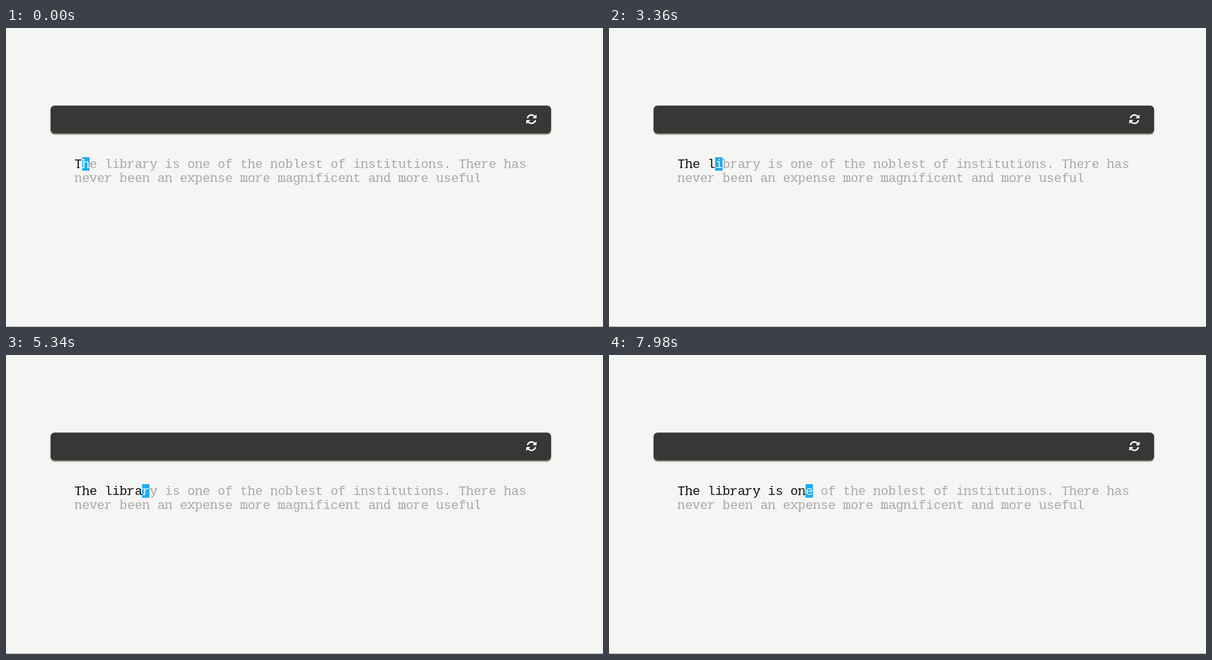
These frames come from a looping animation (1057x530 px, 8000 ms). An HTML page with a canvas:

```html
<!DOCTYPE html>
<html lang="en">
<head>
<meta charset="utf-8">
<title>Typing practice</title>
<style>
  html, body { margin: 0; width: 100%; height: 100%; overflow: hidden; background: #f5f5f4; }
  canvas { display: block; }
</style>
</head>
<body>
<canvas id="stage" width="1057" height="530"></canvas>
<script>
const ctx = document.getElementById('stage').getContext('2d');
const LOOP = 8000;
const LEFT = 121.3, PITCH = 13.335, BASE = 248.3, LEADING = 24.2;
const LINES = [
  'The library is one of the noblest of institutions. There has',
  'never been an expense more magnificent and more useful'
];
// Moments at which the cursor steps one letter onward.
const KEYS = [120, 400, 720, 960, 3640, 5020, 5180, 5320, 5460, 5740,
  6180, 6700, 7140, 7820, 7880, 7940];

// Slab ends: column, row, and an optional side for half slabs.
const COLS = { L: 2.5, M: 1.9, C: 6.6, F: 5.9, N: 11.4, R: 10.8 };
const ROWS = { A: -15.4, x: -10.9, b: -0.8, d: 3.8 };
const SLABS = {
  T: 'Cb', h: 'LA< Lb Rb', n: 'Lx< Lb Rb', m: 'Mx< Mb Cb Nb', b: 'LA< Lb<',
  d: 'RA< Rb>', u: 'Lx< Rx< Rb>', a: 'Rb>', y: 'Lx Rx', v: 'Lx Rx',
  x: 'Lx Rx Lb Rb', p: 'Lx< Ld', g: 'Rx>', f: 'Fb', r: 'Lb Lx<'
};

function drawLetter(ch, x, y, color) {
  ctx.fillStyle = color;
  ctx.fillText(ch, x, y);
  for (const slab of (SLABS[ch] || '').split(' ')) {
    if (!slab) continue;
    const [col, row, side] = slab;
    const cx = x + COLS[col];
    const from = side === '>' ? cx : cx - 2.2;
    const to = side === '<' ? cx : cx + 2.2;
    ctx.fillRect(from, y + ROWS[row] - 0.8, to - from, 1.6);
  }
}

function drawText(cursor) {
  ctx.font = '22.22px "Liberation Mono", "Courier New", monospace';
  ctx.textBaseline = 'alphabetic';
  ctx.fillStyle = '#1eabf2';
  ctx.fillRect(Math.round(LEFT + cursor * PITCH), 229, 13, 24);
  LINES.forEach((line, row) => {
    [...line].forEach((ch, i) => {
      let color = '#a9a9a9';
      if (row === 0 && i < cursor) color = '#111111';
      if (row === 0 && i === cursor) color = '#e9f6fd';
      drawLetter(ch, LEFT + i * PITCH, BASE + row * LEADING, color);
    });
  });
}

function drawBar() {
  ctx.save();
  ctx.shadowColor = 'rgba(70, 64, 48, 0.8)';
  ctx.shadowOffsetY = 2;
  ctx.shadowBlur = 2;
  ctx.fillStyle = '#373736';
  ctx.beginPath();
  ctx.roundRect(79, 137.5, 886, 49, 7);
  ctx.fill();
  ctx.restore();
}

// Half of the reload icon; the other half is the same turned by 180 degrees.
function drawArrow() {
  ctx.lineWidth = 2.7;
  ctx.beginPath();
  ctx.arc(0, 0, 7.4, 0.24, 2.5);
  ctx.stroke();
  ctx.lineWidth = 1;
  ctx.beginPath();
  ctx.moveTo(-8.6, 2);
  ctx.lineTo(-2.9, 2);
  ctx.lineTo(-8.6, 7.7);
  ctx.closePath();
  ctx.fill();
  ctx.stroke();
}

function drawReload() {
  ctx.save();
  ctx.translate(930.3, 161.6);
  ctx.fillStyle = ctx.strokeStyle = '#f7f7f5';
  ctx.lineJoin = 'round';
  drawArrow();
  ctx.rotate(Math.PI);
  drawArrow();
  ctx.restore();
}

function draw(time) {
  const t = time % LOOP;
  ctx.fillStyle = '#f5f5f4';
  ctx.fillRect(0, 0, 1057, 530);
  ctx.fillStyle = '#9c9c9c';
  ctx.fillRect(0, 529, 1057, 1);
  drawBar();
  drawReload();
  drawText(1 + KEYS.filter(key => key <= t).length);
}

const start = performance.now();
function tick() {
  draw(performance.now() - start);
  requestAnimationFrame(tick);
}
tick();
</script>
</body>
</html>
```
